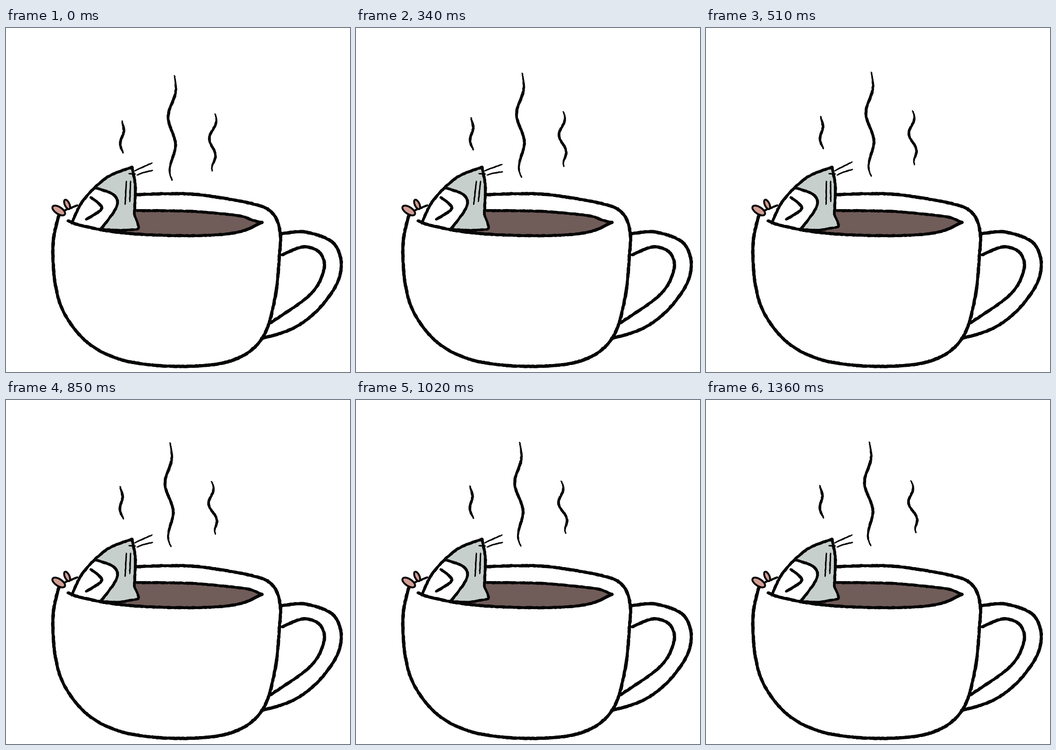
Write an HTML page with a canvas that moves like this. It is 737x737 px and loops after 1.53 s.

```html
<!DOCTYPE html>
<html lang="en">
<head>
<meta charset="utf-8">
<title>Bath in a cup</title>
<style>
  html, body { margin: 0; width: 100%; height: 100%; overflow: hidden; background: #fff; }
  canvas { display: block; width: 100vw; height: 100vh; }
</style>
</head>
<body>
<canvas id="stage" width="737" height="737"></canvas>
<script>
const ctx = document.getElementById('stage').getContext('2d');
const STEP_MS = 170, STEPS = 9;
const INK = '#060606', COFFEE = '#705c59', GREY = '#c7cfcd', PINK = '#d39d93';

const points = text => text.trim().split(/\s+/).map(pair => pair.split(',').map(Number));
const lerp = (a, b, t) => a + (b - a) * t;

// Repeatable random number from -1 to 1.
function noise(i) {
  const v = Math.sin(i * 12.9898) * 43758.5453;
  return 2 * (v - Math.floor(v)) - 1;
}

// Catmull-Rom curve through the points, sampled about every 3 px.
function spline(pts) {
  const out = [pts[0]];
  for (let i = 0; i < pts.length - 1; i++) {
    const a = pts[i - 1] || pts[i], b = pts[i], c = pts[i + 1], d = pts[i + 2] || c;
    const n = Math.max(2, Math.ceil(Math.hypot(c[0] - b[0], c[1] - b[1]) / 3));
    for (let k = 1; k <= n; k++) {
      const t = k / n;
      out.push([0, 1].map(j => b[j] + 0.5 * t * (c[j] - a[j]
        + t * (2 * a[j] - 5 * b[j] + 4 * c[j] - d[j]
        + t * (3 * (b[j] - c[j]) + d[j] - a[j])))));
    }
  }
  return out;
}

// Ink line with a rough edge; taper thins both ends.
function brush(pts, width, taper = 0) {
  const line = spline(pts).map(([x, y], i) => [x + 0.35 * noise(i), y + 0.35 * noise(i + 500)]);
  ctx.strokeStyle = INK;
  ctx.lineCap = 'round';
  for (let i = 1; i < line.length; i++) {
    const u = i / line.length;
    const ends = Math.min(1, Math.min(u, 1 - u) * 5);
    ctx.lineWidth = width * (1 - taper * (1 - ends)) * (1 + 0.13 * noise(i + 900));
    ctx.beginPath();
    ctx.moveTo(...line[i - 1]);
    ctx.lineTo(...line[i]);
    ctx.stroke();
  }
}

function fill(color, ...curves) {
  ctx.fillStyle = color;
  ctx.beginPath();
  curves.flatMap(spline).forEach(p => ctx.lineTo(...p));
  ctx.fill();
}

function paw(x, y, rx, ry, degrees) {
  ctx.beginPath();
  ctx.ellipse(x, y, rx, ry, degrees * Math.PI / 180, 0, 2 * Math.PI);
  ctx.fillStyle = PINK;
  ctx.fill();
  ctx.strokeStyle = INK;
  ctx.lineWidth = 4;
  ctx.stroke();
}

const cup = points(`113,402 101,460 105,545 127,615 180,678 260,714 380,725 485,712
  548,666 576,580 586,485 587,436 571,397 530,377 420,358 350,355 282,357`);
const handleOuter = points('588,441 640,437 698,458 718,500 708,550 665,607 612,645 548,665');
const handleInner = points('592,486 636,469 672,481 681,518 651,572 566,632');
const rim = points('133,413 165,424 250,439 380,445 490,439 549,416');

const back = points('141,418 165,370 215,321 270,298');
const front = points('270,298 277,340 275,400');
const earEdge = points('190,342 230,357 237,383 204,430');
const earFold = points('182,363 205,386 172,410');

function drawCup(full) {
  const surface = [...points('280,391 400,393 497,402'), [526, full ? 407 : 411], [549, 417]];
  fill(COFFEE, surface, rim.slice(2).reverse(), points('203,431 275,400'));
  brush(surface, 5.8);
  brush(cup, 6.6);
  brush(handleOuter, 6.6);
  brush(handleInner, 6.4);
}

function drawBather(full, twitch) {
  const low = full ? 423 : 427;
  const belly = [[275, 400], [284, low], [272, low + 5], [238, 433], [203, 431]];
  fill(GREY, back, front, belly);
  fill('#fff', points('141,418 165,370 190,342'), earEdge);
  brush(rim, 6.2);
  brush(back, 5.8);
  brush(front, 5.8);
  brush(belly, 5);
  brush(earEdge, 5.6);
  brush(earFold, 5.8);

  brush([[258, 328], [255 - twitch, 378]], 3, 0.3);
  brush([[267, 328], [265 - twitch, 372]], 3, 0.3);
  brush([[276, 306], [295, 297 + twitch / 2], [313, 289 + twitch]], 3, 0.3);
  brush([[281, 315], [297, 309 + twitch / 2], [314, 305 + twitch]], 3, 0.3);
  brush([[264, 312], [277, 313]], 3, 0.3);

  brush([[125, 391], [135, 387]], 4);
  brush([[138, 386], [153, 380]], 4.4);
  paw(113, 391, 15.5, 7.5, 33);
  paw(131, 378, 11, 5, 65);
}

// Each wisp is a wave along a line whose two ends drift during the loop.
const wisps = [
  { from: [[249, 199], [251, 268]], to: [[244, 183], [252, 253]],
    waves: 1, phase: 0, sway: 5, shift: -1.5, width: 5.2 },
  { from: [[361, 102], [356, 326]], to: [[350, 90], [353, 312]],
    waves: 1.75, phase: 0.07, sway: 9, shift: -3, width: 5.8 },
  { from: [[448, 184], [442, 306]], to: [[439, 173], [450, 284]],
    waves: 1.5, phase: 0.12, sway: 8, shift: -2, width: 5.2 }
];

function drawWisp({ from, to, waves, phase, sway, shift, width }, progress) {
  const eased = 1 - (1 - progress) ** 2;
  const [top, bottom] = from.map((p, end) => p.map((v, axis) => lerp(v, to[end][axis], eased)));
  const line = [];
  for (let u = 0; u <= 1; u += 1 / 16) {
    const bend = shift + sway * Math.sin(2 * Math.PI * (waves * u + phase));
    const envelope = Math.sqrt(Math.abs(Math.sin(Math.PI * u)));
    line.push([lerp(top[0], bottom[0], u) + bend * envelope, lerp(top[1], bottom[1], u)]);
  }
  brush(line, width, 0.55);
}

function draw(step) {
  // The coffee sloshes all along; the whiskers twitch early in the loop.
  const full = Math.sin(2 * Math.PI * (0.42 * step - 0.05)) > 0;
  const twitch = step < 4 ? -3 * Math.sin(0.75 * Math.PI * step) : 0;
  ctx.fillStyle = '#fff';
  ctx.fillRect(0, 0, 737, 737);
  drawCup(full);
  drawBather(full, twitch);
  wisps.forEach(wisp => drawWisp(wisp, step / (STEPS - 1)));
}

let shown = -1;
const start = performance.now();
function tick(now) {
  const step = Math.floor(Math.max(0, now - start) / STEP_MS) % STEPS;
  if (step !== shown) draw(shown = step);
  requestAnimationFrame(tick);
}
tick(start);
</script>
</body>
</html>
```
